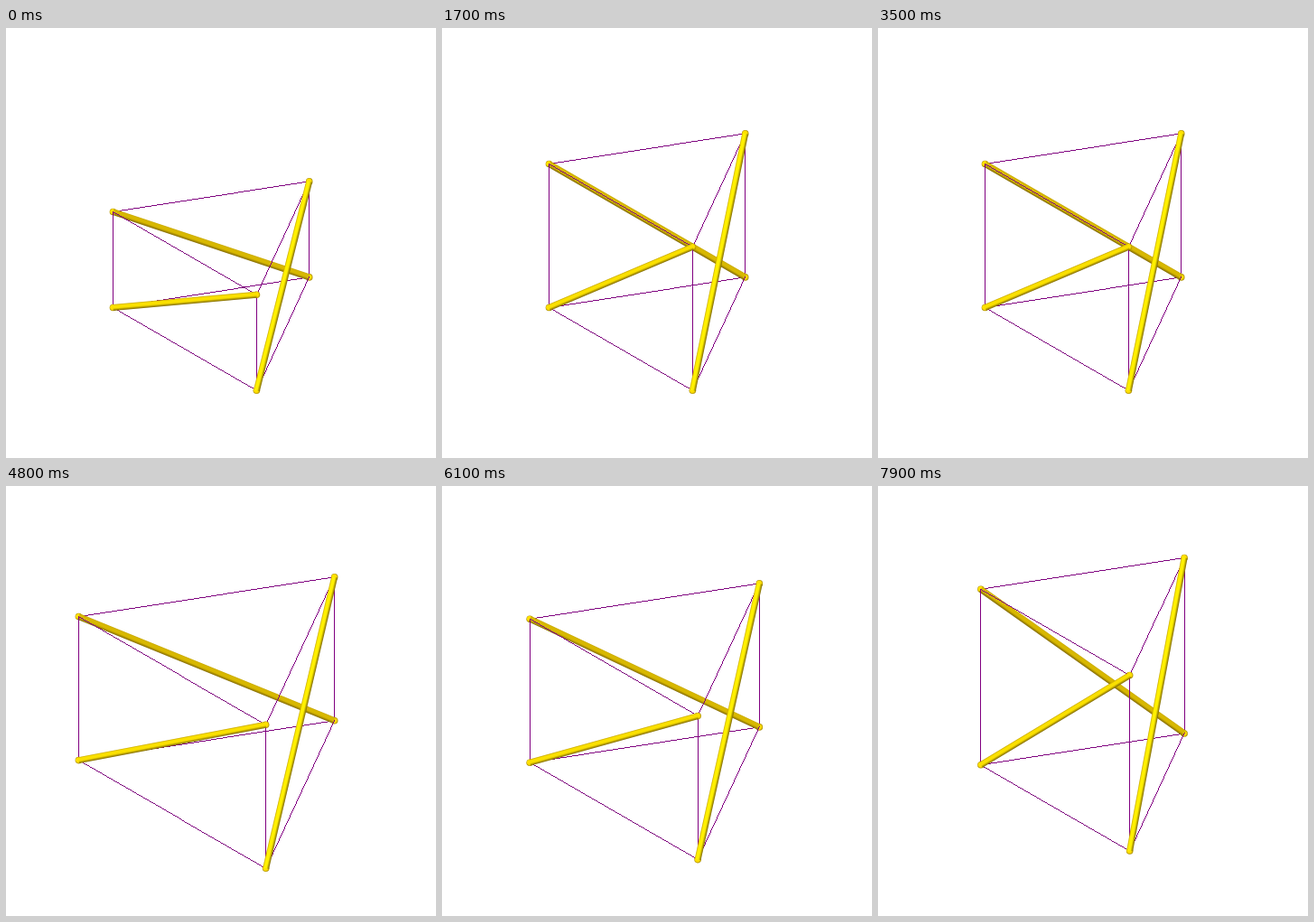
An HTML page with a canvas for the animation above (8000 ms loop, 476 by 476 pixels).

```html
<!DOCTYPE html>
<html lang="en">
<head>
<meta charset="utf-8">
<title>Three-strut prism</title>
<style>
  html, body { margin: 0; width: 100%; height: 100%; overflow: hidden; background: #fff; }
  canvas { display: block; width: 476px; height: 476px; }
</style>
</head>
<body>
<canvas id="stage" width="476" height="476"></canvas>
<script>
const ctx = document.getElementById('stage').getContext('2d');
const LOOP = 8000, STEP = 100;
const CENTER = [243.7, 328.9];
// Triangle corners relative to the centre, at scale 1
const CORNERS = [[-125.2, -19.4], [92, -53], [33.7, 72.4]];

// [time, value] keys
const HEIGHT = [[700, 106], [1600, 156], [1700, 159], [2550, 198.3], [3300, 159],
                [6700, 159], [7900, 194.5], [8200, 198.3]];
const SCALE = [[3500, 1], [3900, 0.8], [4300, 1], [4800, 1.304], [5300, 1.4],
               [6100, 1.17], [6800, 1.037]];

// Slope at a key: zero at ends and turning points
function slope(keys, i) {
  if (i === 0 || i === keys.length - 1) return 0;
  const [a, b, c] = [keys[i - 1], keys[i], keys[i + 1]];
  const d0 = (b[1] - a[1]) / (b[0] - a[0]);
  const d1 = (c[1] - b[1]) / (c[0] - b[0]);
  return d0 * d1 <= 0 ? 0 : 2 * d0 * d1 / (d0 + d1);
}

// Smooth cubic through the keys
function sample(keys, t) {
  const last = keys.length - 1;
  if (t <= keys[0][0]) return keys[0][1];
  if (t >= keys[last][0]) return keys[last][1];
  let i = 0;
  while (t > keys[i + 1][0]) i++;
  const [t0, v0] = keys[i], [t1, v1] = keys[i + 1];
  const d = t1 - t0, u = (t - t0) / d, w = 1 - u;
  return v0 * (1 + 2 * u) * w * w + slope(keys, i) * d * u * w * w +
         v1 * (3 - 2 * u) * u * u - slope(keys, i + 1) * d * u * u * w;
}

// Hard-edged line, one pixel wide
function cable(p, q) {
  const dx = q[0] - p[0], dy = q[1] - p[1];
  const n = Math.ceil(Math.max(Math.abs(dx), Math.abs(dy)));
  ctx.fillStyle = '#800080';
  for (let i = 0; i <= n; i++) {
    ctx.fillRect(Math.floor(p[0] + dx * i / n), Math.floor(p[1] + dy * i / n), 1, 1);
  }
}

function ball(p, light, dark) {
  const g = ctx.createRadialGradient(p[0] - 1, p[1] - 1, 0.5, p[0], p[1], 3.8);
  g.addColorStop(0, light);
  g.addColorStop(0.6, light);
  g.addColorStop(1, dark);
  ctx.fillStyle = g;
  ctx.beginPath();
  ctx.arc(p[0], p[1], 3.8, 0, 2 * Math.PI);
  ctx.fill();
}

function strut(p, q, light, dark) {
  const len = Math.hypot(q[0] - p[0], q[1] - p[1]);
  ball(p, '#ffe000', '#a88a00');
  ball(q, '#ffe000', '#a88a00');
  ctx.save();
  ctx.translate(p[0], p[1]);
  ctx.rotate(Math.atan2(q[1] - p[1], q[0] - p[0]));
  // Lit from the upper left, shaded on the lower right
  const side = q[0] < p[0] ? -1 : 1;
  const g = ctx.createLinearGradient(0, -3.5 * side, 0, 3.5 * side);
  g.addColorStop(0, '#c8a800');
  g.addColorStop(0.2, light);
  g.addColorStop(0.58, light);
  g.addColorStop(1, dark);
  ctx.fillStyle = g;
  ctx.fillRect(0, -3.5, len, 7);
  ctx.restore();
}

function draw(t) {
  const h = sample(HEIGHT, t), s = sample(SCALE, t);
  const [a, b, c] = CORNERS.map(([x, y]) => [CENTER[0] + x * s, CENTER[1] + y * s]);
  const [A, B, C] = [a, b, c].map(([x, y]) => [x, y - h]);

  ctx.fillStyle = '#fff';
  ctx.fillRect(0, 0, 476, 476);
  cable(a, b);
  cable(b, B);
  cable(A, B);
  strut(A, b, '#d8b800', '#806800');
  cable(A, C);
  cable(a, A);
  cable(B, C);
  cable(b, c);
  cable(a, c);
  cable(c, C);
  strut(C, a, '#fae000', '#7c6600');
  strut(B, c, '#fff000', '#7c6600');
}

function tick(now) {
  const t = now % LOOP;
  draw(Math.floor(t / STEP) * STEP);
  requestAnimationFrame(tick);
}
draw(0);
requestAnimationFrame(tick);
</script>
</body>
</html>
```
